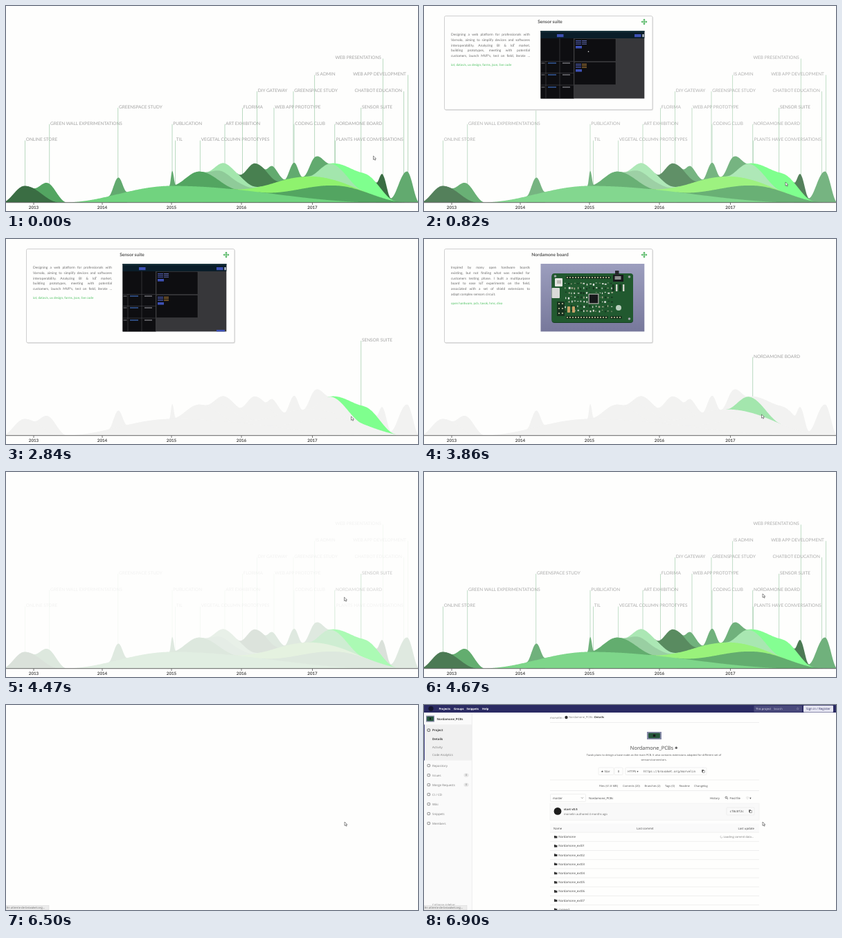
These frames come from a looping animation (595x298 px, 7.11 s). An HTML page:

```html
<!DOCTYPE html>
<html lang="en">
<head>
<meta charset="utf-8">
<title>Project timeline</title>
<style>
html, body { margin: 0; width: 100%; height: 100%; overflow: hidden; background: #fefefd; }
svg { display: block; width: 100%; height: 100%; text-rendering: geometricPrecision; }
text, .copy { font-family: Lato, "Open Sans", sans-serif; }
.web text { font-family: "Open Sans", "Noto Sans", sans-serif; }
.web text.mono { font-family: "DejaVu Sans Mono", monospace; }
.copy { font-size: 4.9px; line-height: 7.75px; color: #6a6a6a; white-space: nowrap; }
.copy div { text-align: justify; text-align-last: justify; }
.copy .last { text-align-last: left; }
.copy .tags { margin-top: 4px; font-size: 4.6px; color: #4fc262; text-align-last: left; }
</style>
</head>
<body>
<svg id="stage" viewBox="0 0 595 298" preserveAspectRatio="none"></svg>
<script>
const LOOP = 7110, BASE = 285.5;
const stage = document.getElementById('stage');

function el(tag, attrs, parent, text) {
  const node = document.createElementNS('http://www.w3.org/2000/svg', tag);
  for (const k in attrs) node.setAttribute(k, attrs[k]);
  if (text !== undefined) node.textContent = text;
  parent.appendChild(node);
  return node;
}
const group = (p, attrs = {}) => el('g', attrs, p);
const rect = (p, x, y, width, height, fill, more = {}) => el('rect', { x, y, width, height, fill, ...more }, p);
const circle = (p, cx, cy, r, fill, more = {}) => el('circle', { cx, cy, r, fill, ...more }, p);
const path = (p, d, more) => el('path', { d, fill: 'none', ...more }, p);
// y is the middle of the capitals
const label = (p, x, y, s, size, fill, more = {}) =>
  el('text', { x, y: y + size * 0.36, 'font-size': size, fill, ...more }, p, s);
const show = (node, on) => node.setAttribute('display', on ? 'inline' : 'none');

// ---------- stacked bands, bottom to top ----------
const MID = [83, 165, 97], SAGE = [98, 170, 111], DARK = [58, 109, 67];
const PALE = [163, 230, 173], DIM = [242, 242, 241];
// colour, centre, height, reach left, reach right, key
const bands = [
  [[113, 211, 127], 239, 24, 155, 300],
  [MID, 480, 22, 115, 100],
  [[143, 242, 110], 415, 18, 90, 110],
  [MID, 280, 22, 42, 55],
  [[143, 203, 153], 316, 17, 32, 45],
  [PALE, 321, 14.5, 32, 48],
  [[72, 128, 80], 360, 34, 26, 36],
  [SAGE, 386, 18, 14, 18],
  [SAGE, 416, 22, 14, 12],
  [PALE, 471, 22.5, 35, 44, 'board'],
  [[127, 255, 142], 519, 26.5, 55, 44, 'suite'],
  [SAGE, 446, 24, 17, 22],
  [DARK, 544, 24, 10, 12],
  [SAGE, 579, 45, 26, 18],
  [SAGE, 240, 22, 4, 5],
  [SAGE, 162, 24, 14, 13],
  [DARK, 27, 24, 33, 50],
  [MID, 62, 22.5, 24, 26]
].map(([color, c, h, left, right, key = 'rest']) => ({ color, c, h, left, right, key }));

function thickness(b, x) {
  const u = (x - b.c) / (x < b.c ? b.left : b.right);
  return Math.abs(u) < 1 ? b.h * Math.cos(u * Math.PI / 2) ** 2 : 0;
}
function bandPath(i) {
  const b = bands[i], from = Math.max(0, b.c - b.left), to = Math.min(595, b.c + b.right);
  let d = `M${from} ${BASE}`;
  const n = Math.ceil(to - from);
  for (let j = 0; j <= n; j++) {
    const x = from + (to - from) * j / n;
    let sum = 0;
    for (let k = 0; k <= i; k++) sum += thickness(bands[k], x);
    d += `L${x.toFixed(1)} ${(BASE - sum).toFixed(2)}`;
  }
  return d + `L${to} ${BASE}Z`;
}
const mix = (c, k) => `rgb(${c.map((v, i) => Math.round(DIM[i] + (v - DIM[i]) * k))})`;

// ---------- chart ----------
const chart = group(stage);
// text, line x, row, key or side
const tags = [
  ['ONLINE STORE', 27.5, 5], ['GREEN WALL EXPERIMENTATIONS', 62.7, 4],
  ['GREENSPACE STUDY', 161.7, 3], ['PUBLICATION', 240, 4], ['TIL', 244.5, 5],
  ['VEGETAL COLUMN PROTOTYPES', 280.4, 5], ['ART EXHIBITION', 316, 4],
  ['FLORIMA', 341.5, 3], ['DIY GATEWAY', 362.5, 2], ['WEB APP PROTOTYPE', 387, 3],
  ['GREENSPACE STUDY', 415, 2], ['CODING CLUB', 416, 4], ['IS ADMIN', 445.6, 1],
  ['PLANTS HAVE CONVERSATIONS', 475.5, 5], ['NORDAMONE BOARD', 474.7, 4, 'board'],
  ['SENSOR SUITE', 512.7, 3, 'suite'], ['WEB PRESENTATIONS', 544.4, 0, 'end'],
  ['WEB APP DEVELOPMENT', 580.5, 1, 'end'], ['CHATBOT EDUCATION', 574.5, 2, 'end']
].map(([text, x, row, kind]) => {
  const y = 75 + row * 23.8, atEnd = kind === 'end', g = group(chart);
  path(g, `M${x} ${y + 1.5}V${BASE}`, { stroke: '#9ccba6', 'stroke-width': 0.7 });
  label(g, atEnd ? x - 2.6 : x + 1.3, y, text, 6.45, '#a2a2a2', { 'text-anchor': atEnd ? 'end' : 'start' });
  return { g, key: atEnd || !kind ? 'rest' : kind };
});
for (let i = bands.length - 1; i >= 0; i--) bands[i].node = el('path', { d: bandPath(i) }, chart);
path(chart, 'M0 285.7H595', { stroke: '#555', 'stroke-width': 0.9 });
[40, 139, 239, 340, 442.5].forEach((x, i) => {
  path(chart, `M${x} 286V289`, { stroke: '#555', 'stroke-width': 0.8 });
  label(chart, x, 293, 2013 + i, 6.2, '#444', { 'text-anchor': 'middle', 'font-weight': 700 });
});

// ---------- cards ----------
function makeCard(title, lines, words) {
  const g = group(stage);
  rect(g, 30.3, 15.5, 300.8, 136.5, '#e4e4e4', { rx: 2 });
  rect(g, 29.5, 14.5, 300.5, 136.3, '#fefefd', { rx: 2, stroke: '#c4c4c4', 'stroke-width': 0.8 });
  label(g, 182, 23, title, 6.6, '#555', { 'text-anchor': 'middle', 'font-weight': 700 });
  path(g, 'M314.5 23H321.5M318 19.5V26.5', { stroke: '#3fae52', 'stroke-width': 1.2 });
  for (let a = 0; a < 360; a += 90)
    path(g, 'M316.2 20.6L318 18.6L319.8 20.6Z', { fill: '#3fae52', transform: `rotate(${a} 318 23)` });
  const box = el('foreignObject', { x: 39, y: 39, width: 114, height: 90 }, g);
  const copy = document.createElement('div');
  copy.className = 'copy';
  const add = (s, name) => {
    const d = document.createElement('div');
    d.className = name;
    d.textContent = s;
    copy.appendChild(d);
  };
  lines.forEach(s => add(s, s.endsWith('circuit.') ? 'last' : ''));
  add(words, 'tags');
  box.appendChild(copy);
  return g;
}
const suiteCard = makeCard('Sensor suite', [
  'Designing a web platform for professionals with',
  'Varnolo, aiming to simplify devices and softwares',
  'interoperability. Analyzing BI & IoT market,',
  'building prototypes, meeting with potential',
  "customers, launch MVP's, test on field, iterate ..."
], 'iot, datavis, ux design, forms, json, live code');
const boardCard = makeCard('Nordamone board', [
  'Inspired by many open hardware boards',
  'existing, but not finding what was needed for',
  'customers testing phase. I built a multipurpose',
  'board to ease IoT experiments on the field,',
  'associated with a set of shield extensions to',
  'adapt complex sensors circuit.'
], 'open hardware, pcb, tavok, hmc, diva');

// dashboard picture
const BLUE = '#3d50b4';
rect(suiteCard, 168.5, 36, 149.8, 98.5, '#37373a');
rect(suiteCard, 168.5, 36, 149.8, 11, '#0a1d29');
rect(suiteCard, 168.5, 36, 149.8, 2, '#18323c');
rect(suiteCard, 168.5, 47, 48, 87.5, '#0e0e11');
[47.5, 81.5].forEach(y => {
  rect(suiteCard, 217, y, 60, 33, '#0e0e11', { stroke: '#4a4a4e', 'stroke-width': 0.4 });
  for (let i = 0; i < 3; i++) {
    const ly = y + 2.5 + i * 2.4;
    rect(suiteCard, 219, ly, 8, 0.9, '#5a6ad0');
    rect(suiteCard, 228, ly, 7, 0.9, y < 60 ? '#6c78c8' : '#c08a3a');
  }
  rect(suiteCard, 219, y + 10.5, 9, 3.6, BLUE);
});
path(suiteCard, 'M176 80V134M196 47V134M216.5 47V134M168.5 80.5H216M168.5 97.5H216M168.5 115H216',
  { stroke: '#55555a', 'stroke-width': 0.5 });
[83, 100, 118].forEach(y => {
  rect(suiteCard, 169.5, y - 0.5, 5, 1, '#77777c');
  rect(suiteCard, 179, y - 0.6, 12, 1.2, '#3f6fc0');
  rect(suiteCard, 200, y - 0.6, 11, 1.2, '#8a8a90');
});
rect(suiteCard, 192, 41, 9.5, 4.2, BLUE);
rect(suiteCard, 304, 41, 9.5, 4.2, BLUE);
rect(suiteCard, 315.5, 41, 2, 4.2, '#d7dbe6');
const dot = circle(suiteCard, 237.5, 66.3, 0.8, '#eee');
const pointer = circle(suiteCard, 309, 46, 1, '#eee');
const footButton = rect(suiteCard, 304, 132, 12, 2.5, BLUE);

// circuit board picture
const defs = el('defs', {}, stage);
const grad = el('linearGradient', { id: 'sky', x1: 0, y1: 0, x2: 0, y2: 1 }, defs);
el('stop', { offset: 0, 'stop-color': '#9c9ebe' }, grad);
el('stop', { offset: 1, 'stop-color': '#77789b' }, grad);
rect(boardCard, 168.5, 36, 149.8, 98.5, 'url(#sky)');
rect(boardCard, 184.5, 51, 117.5, 71, '#153f22', { rx: 4 });
rect(boardCard, 184.5, 50, 117.5, 71, '#21592f', { rx: 4 });
let seed = 11;
const rnd = () => (seed = seed * 16807 % 2147483647) / 2147483647;
const partTones = ['#d6d6ce', '#14301c', '#a9a78e', '#e4e4df'];
// rows of small parts, each with a little jitter
for (let i = 0; i < 112; i++) {
  const x = 203 + i % 16 * 4.4 + rnd() * 1.5, y = 63 + (i >> 4) * 6.6 + rnd() * 2;
  rect(boardCard, x, y, 1 + rnd() * 1.8, 0.8 + rnd() * 2.2, partTones[Math.floor(rnd() * 4)]);
}
function pins(x, y, n) {
  rect(boardCard, x - 2, y - 2, n * 4 + 0.5, 4, '#14301c');
  for (let i = 0; i < n; i++) circle(boardCard, x + i * 4, y, 1.1, '#c9c39e');
}
pins(207, 56, 16);
pins(207, 114, 15);
pins(271, 114, 4);
rect(boardCard, 236, 78, 18, 18, '#21592f');
rect(boardCard, 237.5, 79.5, 15, 15, '#a9aaa4');
rect(boardCard, 238.8, 80.8, 12.4, 12.4, '#16181a');
rect(boardCard, 189, 57, 11, 12, '#e6e6e2', { rx: 1 });
rect(boardCard, 192, 60, 6, 5, '#bdbdb8');
rect(boardCard, 184.5, 71, 11.5, 15, '#d9dad8', { rx: 1 });
rect(boardCard, 192, 91, 11, 21, '#17331f');
for (let i = 0; i < 6; i++) circle(boardCard, 195 + i % 2 * 5, 94 + (i >> 1) * 7, 1.1, '#c9c39e');
[207, 214].forEach(x => rect(boardCard, x, 98, 4, 9, '#c8a267', { rx: 0.8 }));
rect(boardCard, 273, 52, 15, 10, '#17191c');
rect(boardCard, 275.5, 54, 9, 5, '#8d8f90');
rect(boardCard, 276, 46, 5.5, 7, '#26282c');
for (let i = 0; i < 4; i++) rect(boardCard, 272 + i * 5, 66, 2.4, 10, i % 2 ? '#d6d6ce' : '#14301c');
circle(boardCard, 281, 100, 4, '#b9cfbd');
[[189.5, 54], [296.5, 55], [296.5, 116]].forEach(([x, y]) => circle(boardCard, x, y, 1.8, '#9fa3a8'));

// ---------- link hint ----------
const hint = group(stage, { class: 'web' });
rect(hint, 0, 291.5, 200, 6.5, '#ececec', { stroke: '#d6d6d6', 'stroke-width': 0.4 });
label(hint, 1, 295, 'https://brovaket.org/morvelin/Nordamone_PCBs', 4.4, '#777');

// ---------- repository page ----------
const page = group(stage, { class: 'web' });
rect(page, 0, 0, 595, 298, '#fefefd');
const shell = group(page), files = group(page);
const INK = '#444', SOFT = '#777', bold = { 'font-weight': 700 }, middle = { 'text-anchor': 'middle' };
const rule = (p, y) => path(p, `M182 ${y}H484`, { stroke: '#e4e4e4', 'stroke-width': 0.6 });
const frame = (p, x, y, w, h) => rect(p, x, y, w, h, 'none', { stroke: '#e0e0e0', 'stroke-width': 0.5, rx: 1 });
function thumb(x, y, w, h) {
  rect(shell, x, y, w, h, '#8589a6');
  rect(shell, x + w * 0.1, y + h * 0.15, w * 0.8, h * 0.7, '#24553a', { rx: 1 });
  rect(shell, x + w * 0.42, y + h * 0.35, w * 0.16, h * 0.3, '#16181a');
}
function copyIcon(p, x, y) {
  rect(p, x - 1.8, y - 2.2, 2.8, 3.6, '#555');
  rect(p, x - 0.4, y - 0.9, 2.6, 3.2, '#fff', { stroke: '#555', 'stroke-width': 0.5 });
}
rect(shell, 0, 0, 595, 11, '#2b2b63');
circle(shell, 10, 5.3, 3.6, '#15152f');
[['Projects', 21.5], ['Groups', 43], ['Snippets', 61.5], ['Help', 84]].forEach(([s, x]) =>
  label(shell, x, 5.2, s, 4.1, '#fff', bold));
rect(shell, 476.5, 1, 69.5, 9.3, '#4a4a7c', { rx: 1 });
label(shell, 479, 5.3, 'This project', 4.1, '#e8e8f2');
label(shell, 505, 5.3, 'Search', 4.1, '#c4c4da');
label(shell, 537.5, 5.3, '☆', 5, '#e8e8f2');
rect(shell, 548, 0.8, 43, 9.6, '#e6e6f2', { rx: 1 });
label(shell, 569.5, 5.3, 'Sign in / Register', 4.5, '#2b2b63', middle);

rect(shell, 0, 11, 69, 287, '#fafafa');
rect(shell, 0, 28.5, 69, 52, '#f0f0f0');
path(shell, 'M69.3 11V298', { stroke: '#e2e2e2', 'stroke-width': 0.6 });
rect(shell, 0, 28.5, 1, 52, '#4b4b8c');
thumb(3, 15.5, 12, 9);
label(shell, 18.5, 20.3, 'Nordamone_PCBs', 4.3, INK, bold);
const menu = ['Repository', 'Issues', 'Merge Requests', 'CI / CD', 'Wiki', 'Snippets', 'Members'];
function menuIcon(y, tone) {
  rect(shell, 5, y - 1.7, 3.6, 3.4, 'none', { stroke: tone, 'stroke-width': 0.8, rx: 0.6 });
}
menuIcon(36.6, '#444');
label(shell, 12, 36.6, 'Project', 4.4, INK, bold);
label(shell, 12, 49.2, 'Details', 4.4, INK, bold);
label(shell, 12, 61, 'Activity', 4.4, SOFT);
label(shell, 12, 72.6, 'Code Analytics', 4.4, SOFT);
menu.forEach((s, i) => {
  const y = 88 + i * 14;
  menuIcon(y, '#777');
  label(shell, 12, y, s, 4.4, SOFT);
  if (i === 1 || i === 2) {
    rect(shell, 57.5, y - 2.8, 7, 5.6, '#e6e6e6', { rx: 2.8 });
    label(shell, 61, y, '0', 3.8, SOFT, middle);
  }
});
label(shell, 12, 290, 'Collapse sidebar', 4.3, SOFT);

label(shell, 182, 18, 'morvelin  ›', 4.2, SOFT);
circle(shell, 205.5, 18, 2.2, '#333');
label(shell, 209, 18, 'Nordamone_PCBs  ›', 4.1, SOFT);
label(shell, 246, 18, 'Details', 4, INK, bold);
rule(shell, 25.5);
thumb(322, 39, 21, 11);
label(shell, 329, 62, 'Nordamone_PCBs', 7.4, INK, middle);
circle(shell, 364.3, 62.2, 1.7, '#666');
label(shell, 332, 72.5, 'Tavok plans to design a base node as the main PCB. It also contains extensions adapted for different set of', 3.95, '#555', middle);
label(shell, 332, 79.2, 'sensors/connectors.', 3.95, '#555', middle);
frame(shell, 252, 91, 22, 10.5);
label(shell, 255.5, 96.3, '★ Star', 4.3, INK);
frame(shell, 275, 91, 12, 10.5);
label(shell, 281, 96.3, '0', 4.2, INK, middle);
frame(shell, 291, 91, 117, 10.5);
label(shell, 294, 96.3, 'HTTPS ▾', 4.1, INK);
label(shell, 317, 96.3, 'https://brovaket.org/morvelin', 4.3, '#555', { class: 'mono' });
copyIcon(shell, 403, 96.3);
rule(shell, 109);
[['Files (61.8 MB)', 253], ['Commits (20)', 287], ['Branches (2)', 318.5], ['Tags (0)', 348],
  ['Readme', 368.5], ['Changelog', 390]].forEach(([s, x]) => label(shell, x, 117.3, s, 4, '#555'));
rule(shell, 124.5);

frame(files, 182.5, 129.5, 51, 11);
label(files, 186, 135, 'master', 4.3, INK);
path(files, 'M227 134.3L228.5 135.8L230 134.3', { stroke: '#666', 'stroke-width': 0.6 });
label(files, 238, 135, 'Nordamone_PCBs', 4.2, INK);
label(files, 413, 135, 'History', 4.2, INK);
circle(files, 436.5, 134.5, 1.4, 'none', { stroke: '#444', 'stroke-width': 0.7 });
path(files, 'M437.6 135.6L439 137', { stroke: '#444', 'stroke-width': 0.8 });
label(files, 441.5, 135, 'Find file', 4.2, INK);
label(files, 465, 135, '♡ ▾', 4.6, INK);
rect(files, 182, 143, 302, 24.5, '#f9f9f9', { stroke: '#ececec', 'stroke-width': 0.5 });
circle(files, 193, 154.4, 5.4, '#1c1c1c');
label(files, 202, 151.6, 'start v0.5', 4.2, INK, bold);
label(files, 202, 158.3, 'morvelin authored 4 months ago', 4.1, '#666');
frame(files, 437, 149, 40, 11);
label(files, 441.5, 154.5, 'cf8c0f2c', 4.2, INK, { class: 'mono' });
copyIcon(files, 471, 154.5);
rect(files, 182, 172.5, 302, 12.5, '#fafafa');
label(files, 187, 179, 'Name', 4.3, INK);
label(files, 307, 179, 'Last commit', 4.3, INK);
label(files, 477, 179, 'Last update', 4.3, INK, { 'text-anchor': 'end' });
for (let i = 0; i < 9; i++) {
  const y = 191.7 + i * 13.2, name = i > 7 ? 'connect' : 'Nordamone' + (i ? '_ext0' + i : '');
  rule(files, y - 6.6);
  path(files, `M188 ${y + 1.8}v-3.6h1.7l.6.7h2.1v2.9z`, { fill: '#333' });
  label(files, 194.2, y, name, 4.4, INK);
}
circle(files, 429.5, 191.7, 1.5, 'none', { stroke: '#aaa', 'stroke-width': 0.6, 'stroke-dasharray': '6 3' });
label(files, 432.5, 191.7, 'Loading commit data...', 4.1, SOFT);
rect(page, 0, 291.3, 62, 6.7, '#ececec', { stroke: '#d2d2d2', 'stroke-width': 0.4 });
label(page, 1, 294.9, 'En attente de brovaket.org…', 4.2, '#666');

// ---------- mouse ----------
const arrow = path(stage, 'M0 0V5.4L1.3 4.3L2.2 6.2L3.2 5.8L2.3 3.9H4Z',
  { fill: '#fff', stroke: '#444', 'stroke-width': 0.6 });
const hand = path(stage, 'M1 2.6V.5q.7-.9 1.4 0V2q2.6 0 2.6 1.2V5.4H1.2L-.6 3.2q.5-1 1.6-.6Z',
  { fill: '#fff', stroke: '#444', 'stroke-width': 0.6 });

// time, mouse x, y, open card, strength of rest, suite, board
const beats = [
  [0, 530.5, 218, 0, 1, 1, 1],
  [410, 528, 230, 0, 1, 1, 1],
  [610, 524, 248, 0, 1, 1, 1],
  [820, 522, 256, 1, 0.86, 1, 0.86],
  [1020, 522, 256, 1, 0, 1, 0],
  [2440, 515, 257, 1, 0, 1, 0],
  [2640, 506, 258, 1, 0, 1, 0],
  [2840, 498.5, 258, 1, 0, 1, 0],
  [3050, 491, 257, 2, 0, 0.86, 0.3],
  [3250, 488, 256, 2, 0, 0, 1],
  [3860, 487.5, 255, 2, 0, 0, 1],
  [4060, 488, 248, 2, 0, 0, 1],
  [4270, 488, 232, 1, 0, 0.5, 0.5],
  [4470, 488.5, 182, 0, 0.13, 0.62, 0.45],
  [4670, 489, 177, 0, 0.9, 0.96, 0.94],
  [4870, 489, 173, 0, 1, 1, 1],
  [5080, 489, 170, 0, 1, 1, 1]
];

function draw(t) {
  const [, x, y, card, rest, suite, board] = beats.filter(b => b[0] <= t).pop();
  const power = { rest, suite, board };
  bands.forEach(b => b.node.setAttribute('fill', mix(b.color, power[b.key])));
  tags.forEach(l => l.g.setAttribute('opacity', power[l.key]));
  show(suiteCard, card === 1);
  show(boardCard, card === 2);
  show(dot, t < 1020);
  show(pointer, t >= 1420 && t < 2030);
  pointer.setAttribute('cy', 50 + 34 * Math.floor((t - 1420) / 203));
  show(footButton, t >= 2030);
  show(hint, t >= 5280);
  show(page, t >= 6500);
  show(shell, t >= 6700);
  show(files, t >= 6900);
  const linked = t >= 5080 && t < 6500;
  show(hand, linked);
  show(arrow, !linked);
  arrow.setAttribute('transform', `translate(${x} ${y})`);
  hand.setAttribute('transform', `translate(${x} ${y})`);
}

const start = performance.now();
function tick() {
  draw((performance.now() - start) % LOOP);
  requestAnimationFrame(tick);
}
tick();
</script>
</body>
</html>
```
